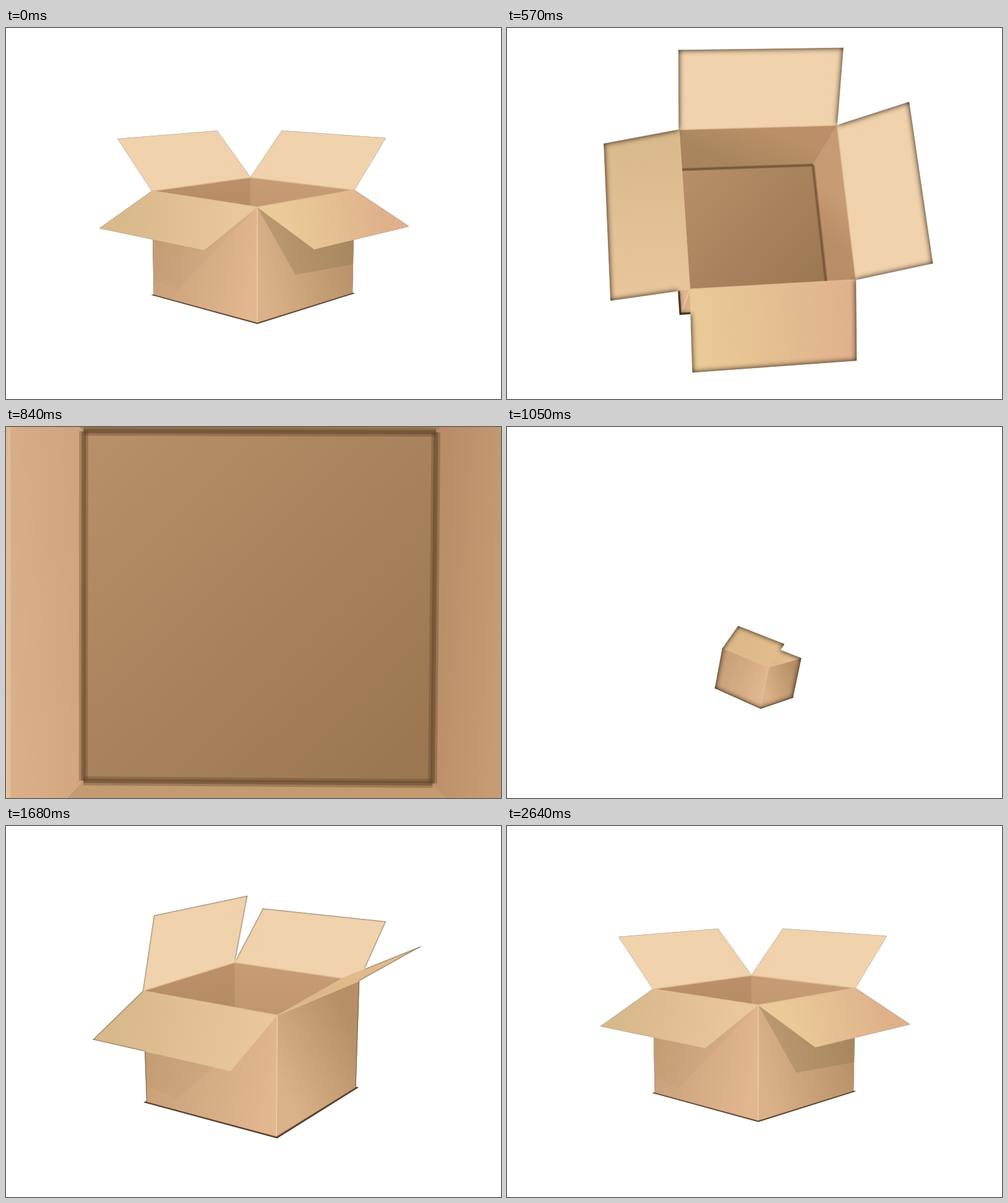
An HTML page with a canvas that plays this animation: 800x600 px, repeating every 2.67 s.

```html
<!DOCTYPE html>
<html lang="en">
<head>
<meta charset="utf-8">
<title>Cardboard box</title>
<style>
html, body { margin: 0; width: 100%; height: 100%; overflow: hidden; background: #fff; }
canvas { display: block; }
</style>
</head>
<body>
<canvas id="stage" width="800" height="600"></canvas>
<script>
const canvas = document.getElementById('stage');
const ctx = canvas.getContext('2d');
const mask = new OffscreenCanvas(800, 600);
const maskCtx = mask.getContext('2d');

const LOOP = 2670, CUT = 940, FOCAL = 1437, HALF = 114.5, RIM = 85;
const RAD = Math.PI / 180;

// time, yaw, pitch, roll, log zoom, x, y, edge shade radius
const DIVE = [
  [0, 46.9, 9.8, 0, 0, 0, -47, .5],
  [360, 36, 43.5, 22, -.015, 1, -31, 2.5],
  [540, 31, 67, 26, .07, 4, -14, 4.5],
  [720, 27, 90, 27, .27, 6, 1, 7],
  [CUT, 27, 90, 27, 1.5, 0, 0, 16]
];
const POP = [
  [CUT, 57, 15, 20, -2.5, 15, -300, 3],
  [1050, 56.5, 15, 11, -.92, 15, -245, 4.5],
  [1440, 58, 17, 2, .18, 0, -46, 2],
  [1680, 56, 15.6, 0, .077, 0, -44, 1.2],
  [2160, 50.7, 12.1, 0, .035, 0, -47, .5],
  [2640, 46.9, 9.8, 0, 0, 0, -47, .5]
];

// n: outward direction; open: resting flap angle; from/to: opening time.
const SIDES = [
  { n: [0, -1], open: 43, from: 1350, to: 1960, flap: ['#efd1ab', '#f0d2ad'],
    wall: ['#c79f78', '#e2b78f'], inside: ['#bb8f68', '#a8855c'] },
  { n: [0, 1], open: -23.6, from: 1300, to: 1885, flap: ['#eacb98', '#dfb18b'],
    wall: ['#dab188', '#b68f66'], inside: ['#c8a078', '#c39a70'] },
  { n: [1, 0], open: 43, from: 1050, to: 1500, flap: ['#f0d2ad', '#efd1ab'],
    wall: ['#dab188', '#b68f66'], inside: ['#c79b73', '#b98d67'] },
  { n: [-1, 0], open: -23.6, from: 930, to: 1320, flap: ['#d8b98c', '#e9c69b'],
    wall: ['#c79f78', '#e2b78f'], inside: ['#d9ae88', '#d0a57e'] }
];

const clamp = v => Math.max(0, Math.min(1, v));
const smooth = v => (v = clamp(v), v * v * (3 - 2 * v));

// Smooth curve through the keys, at rest at both ends.
function poseAt(keys, t) {
  let i = 0;
  while (i < keys.length - 2 && t > keys[i + 1][0]) i++;
  const a = keys[i], b = keys[i + 1], span = b[0] - a[0];
  const u = clamp((t - a[0]) / span);
  const slope = (j, c) => {
    const p = keys[j - 1], q = keys[j + 1];
    return p && q ? (q[c] - p[c]) / (q[0] - p[0]) * span : 0;
  };
  return a.map((v, c) => v + (b[c] - v) * smooth(u)
    + slope(i, c) * u * (1 - u) ** 2 - slope(i + 1, c) * u * u * (1 - u));
}

function camera([, yaw, pitch, roll, zoom, dx, dy]) {
  const [cy, cp, cr] = [yaw, pitch, roll].map(a => Math.cos(a * RAD));
  const [sy, sp, sr] = [yaw, pitch, roll].map(a => Math.sin(a * RAD));
  const distance = FOCAL / Math.exp(zoom);
  return (x, y, z) => {
    const x1 = x * cy + z * sy, z1 = z * cy - x * sy;
    const y2 = y * cp - z1 * sp, z2 = y * sp + z1 * cp;
    const k = FOCAL / (distance - z2);
    return [400 + (x1 * cr + y2 * sr + dx) * k, 300 - (y2 * cr - x1 * sr + dy) * k];
  };
}

const middle = (p, q) => [(p[0] + q[0]) / 2, (p[1] + q[1]) / 2];

function facing(points) {
  return points.reduce((sum, p, i) => {
    const q = points[(i + 1) % points.length];
    return sum + p[0] * q[1] - q[0] * p[1];
  }, 0) > 0;
}

function trace(points) {
  ctx.beginPath();
  points.forEach(p => ctx.lineTo(...p));
  ctx.closePath();
}

function fill(points, colors, from, to) {
  const paint = ctx.createLinearGradient(...from, ...to);
  colors.forEach((c, i) => paint.addColorStop(i, c));
  trace(points);
  ctx.fillStyle = ctx.strokeStyle = paint;
  ctx.lineWidth = .7;
  ctx.fill();
  ctx.stroke();
}

function across(q, colors) {
  fill(q, colors, middle(q[0], q[3]), middle(q[1], q[2]));
}

function line(p, q, color, width) {
  ctx.beginPath();
  ctx.moveTo(...p);
  ctx.lineTo(...q);
  ctx.strokeStyle = color;
  ctx.lineWidth = width;
  ctx.stroke();
}

function drawBox(t, pose) {
  const project = camera(pose);
  const size = Math.exp(pose[4]);
  const square = (r, y) => [[-r, -r], [r, -r], [r, r], [-r, r]].map(([x, z]) => project(x, y, z));

  const sides = SIDES.map(side => {
    const [nx, nz] = side.n;
    const at = (u, out, y) => project(nx * (HALF + out) + nz * u * HALF, y,
      nz * (HALF + out) - nx * u * HALF);
    const angle = t < CUT ? side.open
      : 180 + (side.open - 180) * smooth((t - side.from) / (side.to - side.from));
    const out = HALF * Math.cos(angle * RAD), top = RIM + HALF * Math.sin(angle * RAD);
    const wall = [at(-1, 0, RIM), at(1, 0, RIM), at(1, 0, -RIM), at(-1, 0, -RIM)];
    const flap = [wall[0], wall[1], at(1, out, top), at(-1, out, top)];
    return { ...side, at, angle, wall, flap, near: facing(wall) };
  });
  const near = sides.filter(s => s.near), far = sides.filter(s => !s.near);

  const drawFlap = s => {
    across(s.flap, facing(s.flap) ? s.flap_colors || SIDES.find(o => o.n === s.n).flap
      : ['#dcb686', '#e2bd8e']);
    line(s.wall[0], s.wall[1], 'rgba(226,190,150,.8)', 1.6 * size);
  };

  const plate = square(HALF * 1.03, -RIM - 1);
  trace(plate);
  ctx.fillStyle = '#5f4a33';
  ctx.fill();

  const floor = square(HALF, -RIM);
  if (facing(floor)) {
    fill(floor, ['#b8906a', '#99754f'], floor[0], floor[2]);
  }
  far.forEach(s => fill(s.wall, s.inside, middle(s.wall[0], s.wall[1]), middle(s.wall[2], s.wall[3])));
  if (facing(floor)) {
    far.forEach(s => {
      line(s.wall[2], s.wall[3], 'rgba(95,68,40,.35)', 5 * size);
      line(s.wall[2], s.wall[3], 'rgba(95,68,40,.5)', 2.4 * size);
    });
  }
  far.forEach(drawFlap);

  near.forEach(s => {
    across(s.wall, s.wallColors || SIDES.find(o => o.n === s.n).wall);
    const shade = clamp((20 - s.angle) / 44);
    const south = s.n[1] === 1;
    // Shadow of the hanging flap, as (u, depth) points on the wall.
    const shadow = south ? [[-1, 0], [-.26, .67], [1, .72], [1, 0]]
      : [[1, 0], [-.5, .9], [-1, .85], [-1, 0]];
    trace(shadow.map(([u, d]) => s.at(u, 0, RIM - 2 * RIM * d)));
    ctx.fillStyle = `rgba(140,118,80,${shade * (south ? .36 : .07)})`;
    ctx.fill();
  });
  if (near.length === 2) {
    const corner = near.find(s => near.some(o => o !== s &&
      Math.hypot(o.wall[0][0] - s.wall[1][0], o.wall[0][1] - s.wall[1][1]) < .01));
    if (corner) line(corner.wall[1], corner.wall[2], 'rgba(240,210,172,.75)', 1.6 * size);
  }
  near.forEach(drawFlap);
}

// Soft dark band inside the silhouette.
function shadeEdges(radius) {
  maskCtx.globalCompositeOperation = 'copy';
  maskCtx.fillStyle = '#1c1004';
  maskCtx.fillRect(0, 0, 800, 600);
  maskCtx.globalCompositeOperation = 'destination-out';
  maskCtx.drawImage(canvas, 0, 0);
  ctx.globalCompositeOperation = 'source-atop';
  ctx.filter = `blur(${radius}px)`;
  ctx.drawImage(mask, 0, 0);
  ctx.filter = 'none';
  ctx.globalCompositeOperation = 'source-over';
}

function frame(now) {
  const t = now % LOOP;
  const pose = poseAt(t < CUT ? DIVE : POP, t);
  ctx.clearRect(0, 0, 800, 600);
  ctx.lineJoin = 'round';
  drawBox(t, pose);
  shadeEdges(pose[7]);
  canvas.style.opacity = t < CUT ? clamp((CUT - t) / 50) : 1;
  requestAnimationFrame(frame);
}
requestAnimationFrame(frame);
</script>
</body>
</html>
```
